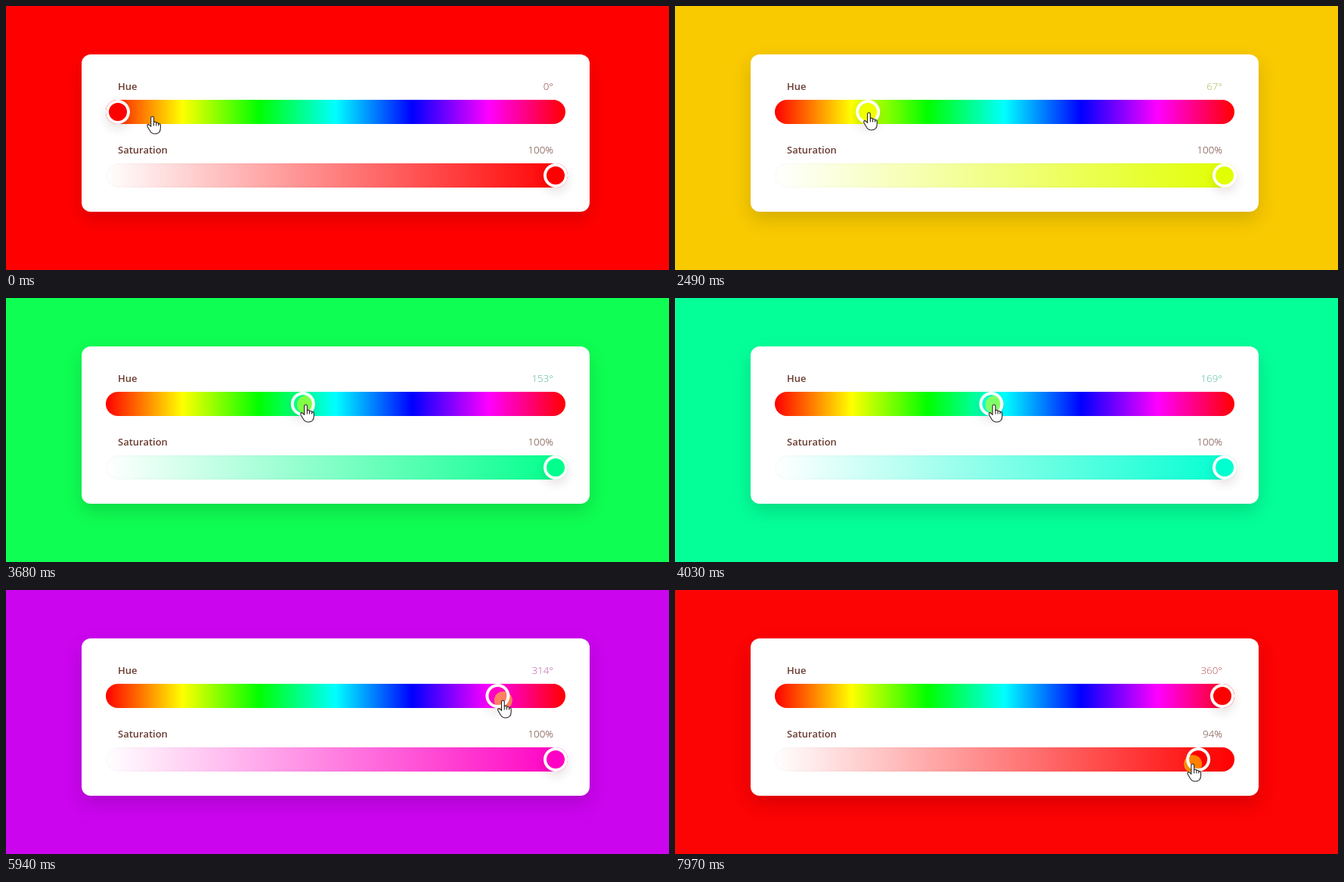
Recreate the animation shown at these times as an HTML page. Size 877 by 349 pixels, loop 8000 ms.

```html
<!DOCTYPE html>
<html lang="en">
<head>
<meta charset="utf-8">
<title>Hue and saturation sliders</title>
<style>
  html, body { margin: 0; width: 100%; height: 100%; overflow: hidden; background: #f00; }
  #stage { position: relative; width: 877px; height: 349px; overflow: hidden; background: #f00; }
  #stage * { position: absolute; box-sizing: border-box; }
  .card {
    left: 100px; top: 64px; width: 672px; height: 208px;
    border-radius: 12px; background: #fff;
    box-shadow: 0 10px 24px rgba(0, 0, 0, .15);
  }
  .label, .value { font: 600 13px/20px "Open Sans", "Noto Sans", sans-serif; color: #6a3d32; white-space: pre; }
  .label { left: 148px; }
  .value { right: 153px; font-weight: 300; font-size: 13.3px; }
  .track { left: 132px; width: 608px; height: 32px; border-radius: 16px; }
  #hueTrack { top: 124px; background: linear-gradient(90deg, #f00, #ff0, #0f0, #0ff, #00f, #f0f, #f00); }
  #satTrack { top: 208px; box-shadow: inset 0 0 5px rgba(0, 0, 0, .04); }
  .thumb, .ring { left: -16px; width: 32px; height: 32px; border-radius: 50%; }
  .thumb { box-shadow: 0 6px 14px rgba(60, 0, 0, .12); }
  .ring { border: 4px solid #fff; }
  #hueThumb, #hueRing { top: 124px; }
  #satThumb, #satRing { top: 208px; }
  #press { left: -12px; top: -12px; width: 24px; height: 24px; border-radius: 50%; background: rgba(255, 255, 0, .5); }
  #hand { left: -10px; top: -2px; }
</style>
</head>
<body>
<div id="stage">
  <div class="card"></div>
  <div class="label" style="top:96px">Hue</div>
  <div class="value" style="top:96px" id="hueText">0°</div>
  <div class="label" style="top:180px">Saturation</div>
  <div class="value" style="top:180px" id="satText">100%</div>
  <div class="track" id="hueTrack"></div>
  <div class="track" id="satTrack"></div>
  <div class="thumb" id="hueThumb"></div>
  <div class="thumb" id="satThumb"></div>
  <div id="press"></div>
  <div class="ring" id="hueRing"></div>
  <div class="ring" id="satRing"></div>
  <svg id="hand" width="24" height="28" viewBox="-10 -2 24 28" fill="#fff" stroke="#2b2320" stroke-width="1.1" stroke-linejoin="round" stroke-linecap="round">
    <path d="M-2.3 2Q-2.3 0-.4 0T1.5 2V7.5Q4.7 6.4 4.7 8.6Q7.7 7.6 7.7 9.8Q10.4 9 10.4 12V15Q10.4 23 3 23Q-1 23-3.3 19.5L-6.6 14Q-8 10.6-5.6 10.6Q-4 10.8-2.3 13.4Z"/>
    <path fill="none" d="M1.5 7.5V12M4.7 8.6V12M7.7 9.8V12"/>
  </svg>
</div>
<script>
  const LOOP = 8000, TAU = 300, STEP = 25;
  const el = id => document.getElementById(id);

  // Monotone cubic curve through [time, value] points
  function curve(points) {
    const slope = i => (points[i + 1][1] - points[i][1]) / (points[i + 1][0] - points[i][0]);
    const tangent = i => {
      if (i === 0 || i === points.length - 1) return 0;
      const a = slope(i - 1), b = slope(i);
      return a * b > 0 ? 2 * a * b / (a + b) : 0;
    };
    return t => {
      if (t <= points[0][0]) return points[0][1];
      const i = points.findIndex((p, n) => n < points.length - 1 && t < points[n + 1][0]);
      if (i < 0) return points[points.length - 1][1];
      const [t0, v0] = points[i], [t1, v1] = points[i + 1];
      const d = t1 - t0, s = (t - t0) / d, r = 1 - s;
      return v0 * (1 + 2 * s) * r * r + v1 * s * s * (3 - 2 * s)
        + d * s * r * (tangent(i) * r - tangent(i + 1) * s);
    };
  }

  const hueAt = curve([[1100, 0], [1620, 15], [2490, 67], [3020, 110], [3500, 144], [4030, 169],
    [4500, 190], [5050, 237], [5500, 278], [5940, 314], [6350, 346], [6630, 360]]);
  const satAt = curve([[7560, 100], [7970, 94], [8100, 90]]);
  const approachX = curve([[210, 194], [710, 148]]);
  const approachY = curve([[210, 146], [710, 141]]);
  const driftY = curve([[1100, 141], [4030, 141], [5050, 142.5], [5940, 146], [6630, 146]]);
  const moveX = curve([[6700, 733], [7350, 720]]);
  const moveY = curve([[6700, 146], [7350, 230]]);

  const hueX = hue => 148 + hue * 1.6;
  const satX = sat => 148 + sat * 5.79;

  function rgb(hue, sat) {
    return [0, 8, 4].map(n => {
      const k = (n + hue / 30) % 12;
      return 127.5 - 127.5 * sat / 100 * Math.max(-1, Math.min(k - 3, 9 - k, 1));
    });
  }

  // The page colour trails the selected one
  function trailingColor(t) {
    const sum = [0, 0, 0];
    let total = 0;
    for (let u = 0; u < 2000; u += STEP) {
      const w = Math.exp(-u / TAU);
      rgb(hueAt(t - u), satAt(t - u)).forEach((c, i) => { sum[i] += c * w; });
      total += w;
    }
    return `rgb(${sum.map(c => Math.round(c / total))})`;
  }

  function pointer(t, hue, sat) {
    if (t < 1100) return [approachX(t), approachY(t)];
    if (t < 6700) return [hueX(hue) + hue * .023, driftY(t)];
    if (t < 7560) return [moveX(t), moveY(t)];
    return [satX(sat) - 7, 230];
  }

  const place = (id, x, y = 0) => { el(id).style.transform = `translate(${x}px, ${y}px)`; };

  function draw(t) {
    const hue = Math.round(hueAt(t)), sat = Math.round(satAt(t));
    const color = `hsl(${hue}, 100%, 50%)`;
    const [px, py] = pointer(t, hueAt(t), satAt(t));
    const pressed = t >= 860 && t < 6680 || t >= 7550;

    el('stage').style.background = trailingColor(t);
    el('hueText').textContent = hue + '°';
    el('hueText').style.color = hue ? `hsl(${hue}, 42%, 53%)` : '#8a4a40';
    el('satText').textContent = sat + '%';
    el('satTrack').style.background = `linear-gradient(90deg, #fff, ${color})`;
    el('hueThumb').style.background = el('satThumb').style.background = color;
    for (const part of ['Thumb', 'Ring']) {
      place('hue' + part, hueX(hue));
      place('sat' + part, satX(satAt(t)));
    }
    place('press', px, py);
    el('press').style.visibility = pressed ? 'visible' : 'hidden';
    place('hand', px, py);
  }

  const start = performance.now();
  function tick() {
    draw((performance.now() - start) % LOOP);
    requestAnimationFrame(tick);
  }
  draw(0);
  requestAnimationFrame(tick);
</script>
</body>
</html>
```
